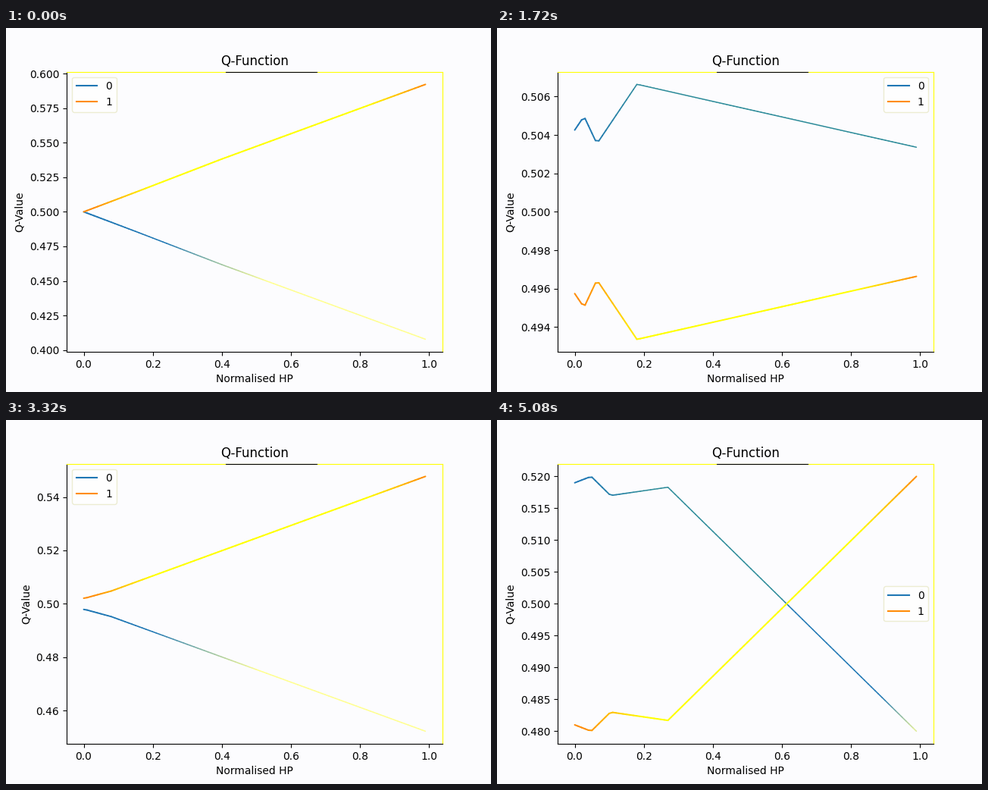
A matplotlib script for the animation above (5120 ms loop, 640x480 px).

```python
import numpy as np
import matplotlib.pyplot as plt
from matplotlib.animation import FuncAnimation
from matplotlib.collections import LineCollection
from matplotlib.colors import to_rgb
from matplotlib.lines import Line2D

FRAMES, STEP = 128, 40
PAPER = "#fcfcfe"
BLUE, TEAL, PALE = "#1f77b4", "#35958f", "#ffff90"
ORANGE, YELLOW = "#ff8c08", "#ffff00"

# frame, knee position, then heights above 0.5 (in thousandths)
# at the start, bump, dip, knee and end of the curve
POSES = np.array([
    [0, .40, 0, -7.3, -15.2, -38.2, -92.2],
    [17, .17, 13.5, 14.1, 11.7, 12.8, -23.9],
    [32, .175, 4.7, 5.4, 3.9, 6.53, -.43],
    [54, .19, 3.45, 4.2, 2.9, 6.85, 10.3],
    [83, .08, -2.1, -2.1, -2.7, -4.8, -47.7],
    [109, .355, 25.7, 27.0, 23.3, 26.0, .4],
    [127, .27, 19.0, 20.0, 17.0, 18.3, -20.0],
])

x = np.arange(100) / 100
mid = (x[1:] + x[:-1]) / 2


def ramp(v, start, stop):
    return np.clip((v - start) / (stop - start), 0, 1)


def blend(a, b, t):
    return a + (np.array(to_rgb(b)) - a) * t[:, None]


def pose(n):
    """Parameters at frame n, gathering speed between two poses."""
    i = min(np.searchsorted(POSES[:, 0], n, side="right"), len(POSES) - 1)
    a, b = POSES[i - 1], POSES[i]
    t = ((n - a[0]) / (b[0] - a[0])) ** 1.5
    return (a + (b - a) * t)[1:]


def curve(n):
    knee, *heights = pose(n)
    knots = [0, .23 * knee - .0145, .44 * knee - .015, knee, .99]
    return np.interp(x, knots, heights) / 1000


def paint(stroke, y, colors, width):
    pts = np.column_stack([x, y])
    stroke.set_segments(np.stack([pts[:-1], pts[1:]], axis=1))
    stroke.set_color(colors)
    stroke.set_linewidth(width)


fig, ax = plt.subplots(figsize=(6.4, 4.8), dpi=100, facecolor=PAPER)
ax.set_facecolor(PAPER)
ax.set_title("Q-Function")
ax.set_xlabel("Normalised HP")
ax.set_ylabel("Q-Value")
for side in ("top", "right"):
    ax.spines[side].set_edgecolor(YELLOW)
fig.add_artist(Line2D([290 / 640, 410 / 640], [.88, .88], color="black", lw=.8))

# Hidden lines drive the axis limits and the legend; strokes carry the colour.
line0, = ax.plot(x, x, color=BLUE, label="0")
line1, = ax.plot(x, x, color=ORANGE, label="1")
ax.legend(loc="best", edgecolor="#e8e8c8")
for line in (line0, line1):
    line.set_visible(False)
stroke0, stroke1 = (
    ax.add_collection(LineCollection([], capstyle="round", zorder=z),
                      autolim=False)
    for z in (2, 2.1))


def draw(n):
    d = curve(n)
    line0.set_data(x, .5 + d)
    line1.set_data(x, .5 - d)
    ax.relim()
    ax.autoscale_view()

    # The falling line pales with depth, sooner when it is shallow.
    peak = np.abs(d).max()
    depth = -d[1:] / peak - np.ptp(d) / (2 * peak)
    glow = ramp(mid, .03, .2)
    cool = blend(np.array(to_rgb(BLUE)), TEAL, .7 * glow * (d[1:] > 0))
    cool = blend(cool, PALE, ramp(depth, -.25, .05))
    paint(stroke0, .5 + d, cool, 1.4 - .3 * glow)

    rising = d[-1] < d[-2]
    glow = glow * (1 - rising * ramp(mid, .82, .99))
    warm = blend(np.array(to_rgb(ORANGE)), YELLOW, glow)
    paint(stroke1, .5 - d, warm, 1.45)
    return stroke0, stroke1


anim = FuncAnimation(fig, draw, frames=FRAMES, interval=STEP,
                     init_func=lambda: draw(0), repeat=True, repeat_delay=0)
plt.show()
```
